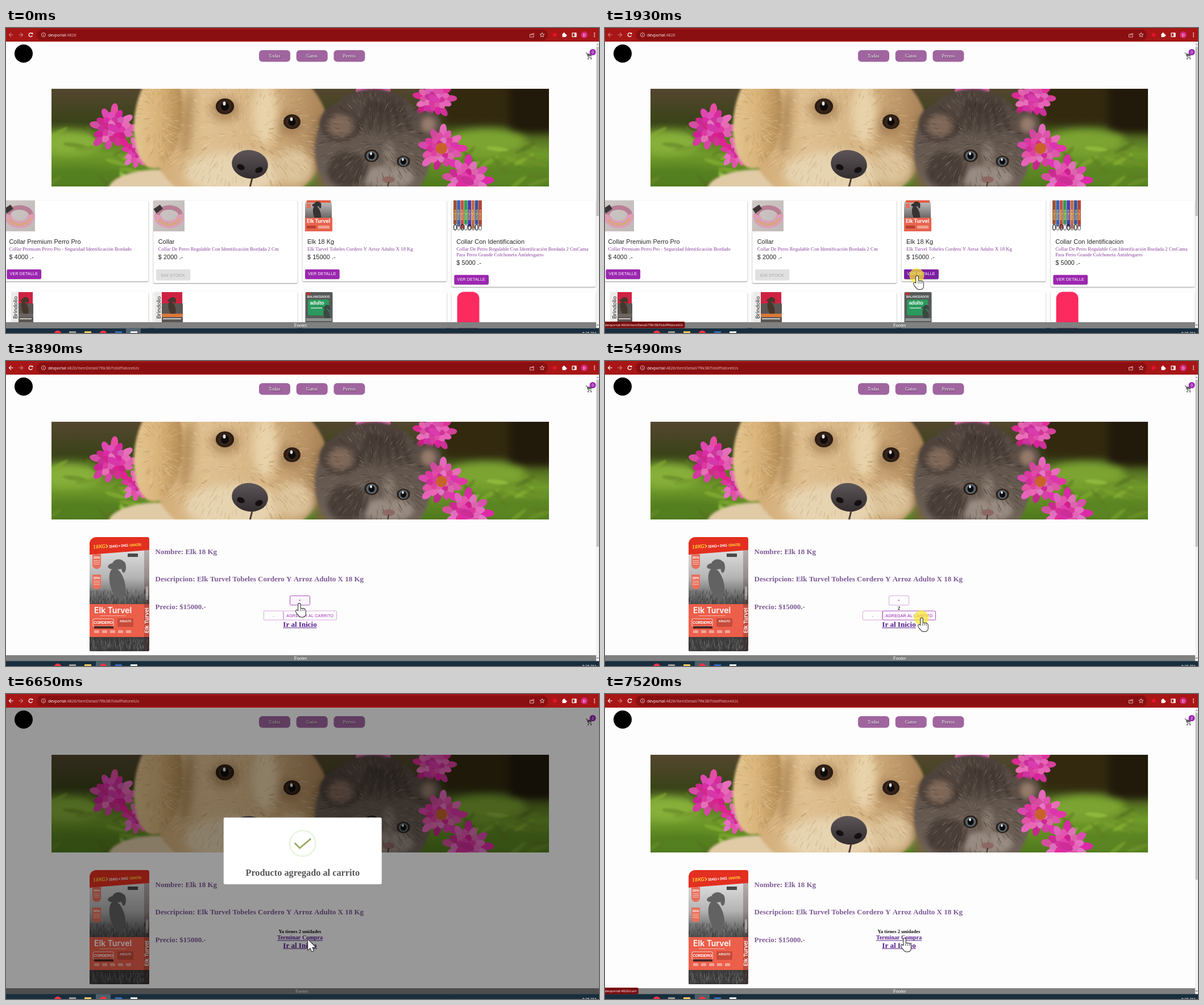
Recreate the animation shown at these times as an HTML page with a canvas. Size 1043 by 537 pixels, loop 8 s.

```html
<!DOCTYPE html>
<html lang="es">
<head>
<meta charset="utf-8">
<title>Tienda de mascotas</title>
<style>
html, body { margin: 0; width: 100%; height: 100%; overflow: hidden; background: #fdfdfd; }
canvas { display: block; width: 1043px; height: 537px; }
</style>
</head>
<body>
<canvas id="stage" width="1043" height="537"></canvas>
<script>
const W = 1043, H = 537, LOOP = 8000;
const PURPLE = '#9c27b0', HOST = 'devportal', PORT = ':4826', ITEM = '/itemDetail/7Rk38iTobilfNdorelUs';
const NAV = 1990, LOADED = 2320, ADDED = 5520, CLOSING = 7059, CLOSED = 7209;

const serif = px => px + 'px "Liberation Serif", serif', bold = px => 'bold ' + serif(px);
const sans = px => px + 'px "Liberation Sans", sans-serif', heavy = px => 'bold ' + sans(px);
const ui = px => px + 'px "Open Sans", sans-serif', brand = px => '600 ' + px + 'px Inter, sans-serif';

let g = document.getElementById('stage').getContext('2d');
let seed = 7;
const rnd = () => (seed = seed * 16807 % 2147483647) / 2147483647;
const clamp = v => Math.min(1, Math.max(0, v));
const ease = v => v * v * (3 - 2 * v);

// ---------- helpers ----------
function rect(x, y, w, h, color) { g.fillStyle = color; g.fillRect(x, y, w, h); }

function box(x, y, w, h, r, fill, line, lw = 1) {
  g.beginPath();
  g.roundRect(x, y, w, h, r);
  if (fill) { g.fillStyle = fill; g.fill(); }
  if (line) { g.strokeStyle = line; g.lineWidth = lw; g.stroke(); }
}

function oval(x, y, rx, ry, color, turn = 0) {
  g.beginPath();
  g.ellipse(x, y, rx, ry, turn, 0, 7);
  g.fillStyle = color;
  g.fill();
}

function ring(x, y, rx, ry, color, lw, from = 0, to = 7) {
  g.beginPath();
  g.ellipse(x, y, rx, ry, 0, from, to);
  g.strokeStyle = color;
  g.lineWidth = lw;
  g.stroke();
}

function line(p, color, lw) {
  g.beginPath();
  for (let i = 0; i < p.length; i += 2) g.lineTo(p[i], p[i + 1]);
  g.strokeStyle = color;
  g.lineWidth = lw;
  g.stroke();
}

function text(s, x, y, font, color, align = 'left', spacing = 0) {
  g.font = font;
  g.fillStyle = color;
  g.textAlign = align;
  g.letterSpacing = spacing + 'px';
  g.fillText(s, x, y);
  const w = g.measureText(s).width;
  g.letterSpacing = '0px';
  return w;
}

function fade(x0, y0, x1, y1, ...colors) {
  const f = g.createLinearGradient(x0, y0, x1, y1);
  colors.forEach((c, i) => f.addColorStop(i / (colors.length - 1), c));
  return f;
}

function placed(x, y, angle, draw) {
  g.save();
  g.translate(x, y);
  g.rotate(angle);
  draw();
  g.restore();
}

function upward(s, x, y, font, color) { placed(x, y, -Math.PI / 2, () => text(s, 0, 0, font, color)); }

function blurred(px, draw) {
  g.filter = `blur(${px}px)`;
  draw();
  g.filter = 'none';
}

function shadowed(color, blur, dx, dy, draw) {
  g.shadowColor = color;
  g.shadowBlur = blur;
  g.shadowOffsetX = dx;
  g.shadowOffsetY = dy;
  draw();
  g.shadowColor = 'transparent';
}

function layer(draw) {
  const c = document.createElement('canvas'), main = g;
  c.width = W;
  c.height = H;
  g = c.getContext('2d');
  draw();
  g = main;
  return c;
}

// ---------- banner ----------
function flower(x, y, r, heart) {
  for (let i = 0; i < 30; i++) {
    const a = i * 2.4, d = r * (0.85 - i * 0.028);
    oval(x + Math.cos(a) * d, y + Math.sin(a) * d, r * 0.3, r * 0.16, `hsl(${316 + rnd() * 10},${60 + rnd() * 15}%,${46 + rnd() * 22}%)`, a);
  }
  if (heart) oval(x, y, r * 0.25, r * 0.25, '#c8622a');
}

// short hairs pointing away from the middle of an oval
function fur(x, y, rx, ry, count, colors) {
  g.globalAlpha = 0.3;
  for (let i = 0; i < count; i++) {
    const a = rnd() * 7, d = Math.sqrt(rnd()), c = Math.cos(a), s = Math.sin(a), px = x + rx * d * c, py = y + ry * d * s;
    line([px, py, px + c * 9, py + s * 9 + 2], colors[i % colors.length], 1.2);
  }
  g.globalAlpha = 1;
}

function eye(x, y, r, iris) {
  oval(x, y, r * 1.15, r, '#2a1d15');
  oval(x, y, r * 0.85, r * 0.8, iris);
  oval(x, y, r * 0.5, r * 0.55, '#0d0b0b');
  oval(x - 1, y - r * 0.35, r * 0.18, r * 0.25, '#e4e6e8');
}

function garden() {
  rect(80, 107, 875, 172, fade(0, 107, 0, 279, '#54462f', '#3a4319', '#6f9a2a', '#4f781d'));
  blurred(7, () => {
    oval(110, 202, 60, 22, '#86b03a');
    oval(130, 262, 80, 16, '#547f20');
    rect(770, 95, 200, 75, '#33290f');
    rect(885, 95, 80, 90, '#211a0b');
    oval(845, 200, 70, 22, '#7ca432');
    oval(900, 262, 90, 18, '#5b8522');
  });
  blurred(1.5, () => {
    for (let i = 0; i < 40; i++) {
      oval((i % 2 ? 800 : 80) + rnd() * 150, 185 + rnd() * 95, 20, 4, `hsla(80,55%,${28 + rnd() * 26}%,.6)`, rnd() * 2 - 1);
    }
  });
  flower(188, 176, 40);
  flower(234, 218, 30);
  flower(645, 100, 36);
  flower(752, 124, 36);
}

function puppy() {
  blurred(2, () => {
    oval(270, 285, 90, 36, '#e0cba6');
    oval(410, 185, 158, 135, fade(250, 0, 568, 0, '#cfa871', '#dfc092', '#d5b281', '#a67f54'));
    oval(268, 160, 42, 88, fade(225, 0, 310, 0, '#e3c48f', '#d9b47a', '#b68d56'), 0.12);
  });
  blurred(8, () => {
    oval(318, 165, 9, 60, '#b08a58', 0.1);
    oval(556, 225, 14, 70, '#7b6044');
    oval(385, 143, 26, 20, '#b08b5e');
    oval(500, 170, 24, 20, '#a98459');
    oval(455, 150, 22, 55, '#e8d2aa');
    oval(400, 255, 85, 38, '#e6d3b0');
    oval(505, 245, 36, 32, '#dcc39a');
  });
  fur(410, 190, 140, 100, 700, ['#f3e4c4', '#a98150', '#d2ae78']);
  fur(268, 165, 34, 72, 150, ['#f0d9ac', '#a98150']);
  eye(385, 138, 14, '#3a2417');
  eye(503, 165, 13, '#3a2417');
  oval(429, 240, 32, 25, fade(0, 215, 0, 265, '#5d5557', '#332d2f'), 0.15);
  oval(413, 245, 7, 5, '#141011', 0.4);
  oval(445, 250, 7, 5, '#141011', -0.4);
  line([433, 264, 429, 281], '#4d3b33', 3);
}

function kitten() {
  blurred(2, () => {
    oval(646, 215, 102, 108, fade(0, 107, 0, 279, '#4c413a', '#62564d', '#6f6259'));
    oval(588, 168, 36, 34, '#4f433c');
    oval(738, 172, 28, 24, '#5b4e46', -0.4);
  });
  blurred(4, () => {
    oval(588, 172, 22, 20, '#7f6757');
    oval(743, 170, 13, 14, '#957b6b');
    oval(672, 262, 46, 20, '#988b81');
    oval(600, 250, 36, 32, '#4a3f38');
    oval(674, 225, 9, 26, '#887a6f');
    for (let i = 0; i < 6; i++) oval(630 + i * 14, 155, 3, 32, '#342b26', 0.35 - i * 0.14);
  });
  fur(650, 205, 92, 90, 600, ['#a09184', '#2b2420', '#76685d']);
  eye(643, 225, 11, '#56646c');
  eye(699, 235, 10, '#56646c');
  oval(673, 267, 11, 6, '#8d6862');
  line([673, 271, 671, 282], '#40322e', 2);
}

function banner() {
  g.save();
  g.beginPath();
  g.rect(80, 107, 875, 172);
  g.clip();
  garden();
  puppy();
  kitten();
  flower(766, 212, 40, true);
  flower(810, 268, 42);
  g.restore();
}

// ---------- products ----------
function dog(x, y, s, color) {
  oval(x, y + 12 * s, 13 * s, 28 * s, color, -0.25);
  oval(x + 2 * s, y - 22 * s, 11 * s, 9 * s, color);
  oval(x - 8 * s, y - 19 * s, 9 * s, 5 * s, color, -0.2);
  oval(x + 11 * s, y - 17 * s, 4 * s, 10 * s, color);
}

function grass(x, y, w, h) {
  for (let i = 0; i < w * 3; i++) {
    const px = x + rnd() * w, py = y + rnd() * h, v = 30 + rnd() * 120 | 0;
    line([px, py, px + rnd() * 4 - 2, py - 7], `rgba(${v},${v},${v},.6)`, 0.8);
  }
}

function bigBag() {
  g.save();
  g.beginPath();
  g.roundRect(147, 310, 105, 201, [12, 4, 3, 2]);
  g.clip();
  rect(147, 310, 105, 201, fade(0, 335, 0, 428, '#dcdcdc', '#b4b4b4', '#4a4a4a'));
  grass(147, 408, 105, 22);
  dog(196, 380, 1, '#626262');
  rect(147, 428, 105, 58, '#ec5f4b');
  rect(147, 486, 105, 26, '#3a3a3a');
  grass(147, 493, 105, 18);
  rect(243, 320, 9, 191, 'rgba(60,20,20,.25)');
  placed(147, 319, -0.08, () => rect(-4, -10, 120, 32, '#e32f20'));
  g.restore();
  placed(153, 330.5, -0.06, () => {
    text('18KG', 0, 0, 'italic 700 9px Lato, sans-serif', '#ffd23c');
    line([23, -6, 26, -3, 23, 0], '#ffd23c', 1.4);
    text('15 KG + 3 KG', 28, 0, heavy(6.6), '#fff', 'left', -0.7);
    text('GRATIS', 64, 0, heavy(6.6), '#ffd23c', 'left', -0.6);
  });
  for (const y of [340, 376]) {
    box(152, y, 15, 26, [0, 0, 7, 7], '#e7705c');
    text('30%', 159.5, y + 8, heavy(6), '#fff', 'center');
    for (let i = 0; i < 3; i++) rect(154, y + 11 + i * 3, 11, 1, '#f5c4ba');
  }
  rect(214, 339, 18, 6, '#4a4a4a');
  text('Elk Turvel', 155, 444, brand(14), '#fff');
  rect(165, 448, 46, 1, '#f6b7ac');
  box(153, 454, 36, 13, 2, '#e4503c', '#fff', 0.8);
  text('CORDERO', 171, 463, heavy(7), '#fff', 'center', -0.3);
  box(196, 453, 28, 15, 2, '#c74a3a');
  text('ADULTO', 210, 460, heavy(5), '#fff', 'center');
  rect(155, 467, 34, 4, '#4b2622');
  for (let i = 0; i < 5; i++) rect(155 + i * 14, 474, 9, 5, '#f1a598');
  upward('Elk Turvel', 250.5, 479, brand(9.5), '#fff');
  upward('CORDERO', 250, 420, heavy(4.5), '#eee');
}

function collar(x) {
  rect(x, 303.5, 55, 54.5, fade(x, 303, x + 55, 358, '#cfc8c6', '#bfb9b8'));
  ring(x + 28, 329, 20, 13, '#b97f96', 8, 3, 6.4);
  ring(x + 28, 331, 20, 15, '#dc9fb5', 13, -0.2, 3.3);
  g.setLineDash([3, 2]);
  ring(x + 28, 331, 20, 15, '#d3ac55', 4, 0.3, 2.7);
  g.setLineDash([]);
  placed(x + 9, 319, -0.6, () => rect(-7, -5, 14, 9, '#3a3635'));
}

function smallBag() {
  box(526, 303.5, 47, 54.5, [6, 6, 0, 0], fade(0, 303, 0, 334, '#c9c7c6', '#6b6766'));
  rect(529, 303.5, 42, 4, '#e4593f');
  dog(547, 321, 0.5, '#353333');
  rect(529, 309, 7, 8, '#e7705c');
  rect(526, 334, 48, 24, '#e8634e');
  text('Elk Turvel', 549.5, 343, 'bold 8.6px Inter, sans-serif', '#fff', 'center');
  rect(529, 348, 16, 5, '#b8402f');
  rect(549, 348, 20, 5, '#f0a394');
}

function straps() {
  for (let i = 0; i < 8; i++) {
    const x = 787 + i * 6.3;
    rect(x, 303.5, 5.8, 42 + i % 3 * 4, `hsl(${[18, 220, 5, 140, 250][i % 5]},52%,${40 + i % 3 * 6}%)`);
    upward('RONDA', x + 4.7, 338, heavy(5), '#e8cf6a');
    ring(x + 3, 351, 2.4, 4.8, i % 2 ? '#777' : '#222', 1.3);
  }
}

function stripBag(x, w, low) {
  rect(x, 465, w, 53, '#ecebea');
  rect(x + 13, 465, w - 14, 20, fade(x + 13, 0, x + w, 20, '#5a2b33', '#cf2243'));
  rect(x + 13, 485, w - 13, 33, '#5b5654');
  dog(x + w * 0.62, 488, 0.46, '#46372c');
  rect(x + 13, 503, w - 13, 6, low);
  rect(x + 15, 511, w - 18, 2, '#cfcac7');
  upward('Brindolio', x + 10.5, 512, '10px Lato, sans-serif', '#222');
}

function greenBag() {
  box(526.5, 465, 48, 60, 2, '#565b59');
  rect(528, 466, 8, 4, '#c23030');
  text('BALANCEADOS', 549.5, 474.5, heavy(5.4), '#eee', 'center', -0.2);
  box(531, 478, 37, 28, 3, '#2c9a5e');
  text('adulto', 547, 487, heavy(8.4), '#fff', 'center');
  rect(536, 492, 20, 2, '#9fd4b5');
  dog(564, 500, 0.4, '#3b4a42');
  rect(528, 511, 45, 5, '#8f9492');
}

// ---------- browser and page ----------
function browser(inDetail) {
  const soft = '#e7c3c3', pale = '#cf8080';
  rect(0, 0, W, 24, '#a81616');
  box(54, 2.5, 899, 19.5, 9.7, '#8a0f11');
  const arrow = (x, d, c) => {
    line([x - 3.6, 12, x + 3.6, 12], c, 1.1);
    line([x, 12 - 3.6, x + d * 3.6, 12, x, 12 + 3.6], c, 1.1);
  };
  arrow(9, -1, inDetail ? '#fff' : pale);
  arrow(26, 1, pale);
  ring(43.5, 12, 3.2, 3.2, '#fff', 1.3, 0.4, 5.6);
  rect(45, 8.5, 2.4, 2.4, '#fff');
  ring(66, 12, 3.6, 3.6, soft, 0.9);
  text('i', 66, 14.3, heavy(6), soft, 'center');
  const w = text(HOST, 74, 14.8, ui(7.1), '#fff');
  text(PORT + (inDetail ? ITEM : ''), 74 + w, 14.8, ui(7.1), '#e3b9b9');
  box(921.5, 11, 6.5, 5, 0, null, soft, 0.9);
  line([924, 13, 926, 10, 929, 10], soft, 0.9);
  const star = [];
  for (let i = 0; i <= 10; i++) {
    const r = i % 2 ? 1.8 : 4.2, a = i * Math.PI / 5 - Math.PI / 2;
    star.push(943 + Math.cos(a) * r, 12.3 + Math.sin(a) * r);
  }
  line(star, soft, 0.9);
  oval(965, 12, 3.5, 3.5, '#e3122b');
  rect(978.5, 10, 6, 6, '#fff');
  oval(981.5, 9.6, 1.5, 1.5, '#fff');
  oval(985, 13, 1.5, 1.5, '#fff');
  box(996, 8.8, 7, 6.6, 0.5, null, '#fff', 1.2);
  rect(1000, 9, 3, 6, '#fff');
  oval(1017, 12, 6, 6, '#d3277d');
  text('D', 1017, 14.6, sans(7), '#fff', 'center');
  for (let i = 0; i < 3; i++) oval(1035, 9 + i * 3, 0.9, 0.9, '#fff');
}

function header() {
  rect(0, 24, W, 504, '#fdfdfd');
  oval(31, 45, 16, 16, '#000');
  ['Todas', 'Gatos', 'Perros'].forEach((s, i) => {
    const x = 445 + i * 65.7;
    box(x, 39, 55, 20.5, 6, '#a0659f');
    shadowed('rgba(0,0,0,.6)', 1.5, 0.7, 0.7, () => text(s, x + 27.3, 52, serif(8.69), '#fff', 'center'));
  });
  line([1019.5, 44, 1021.5, 44, 1024.5, 51.5, 1030, 51.5], '#5f5f5f', 1.2);
  rect(1022.5, 45.3, 7.5, 4.2, '#5f5f5f');
  for (const x of [1024, 1029]) oval(x, 54, 1.2, 1.2, '#5f5f5f');
  banner();
}

function card(x, y, h) {
  shadowed('rgba(0,0,0,.42)', 2, 0, 0.9, () => box(x, y, 253.5, h, 2, '#fff'));
}

function detailButton(x, y, color) {
  box(x, y, 60.7, 17, 2.2, color);
  rect(x + 1, y + 17, 58.7, 0.8, 'rgba(0,0,0,.22)');
  text('VER DETALLE', x + 5.2, y + 10.4, sans(7.06), '#fff', 'left', 0.2);
}

const items = [
  { name: 'Collar Premium Perro Pro', price: 4000, about: ['Collar Premium Perro Pro - Seguridad Identificación Bordado'] },
  { name: 'Collar', price: 2000, sold: true, about: ['Collar De Perro Regulable Con Identificación Bordada 2 Cm'] },
  { name: 'Elk 18 Kg', price: 15000, about: ['Elk Turvel Tobeles Cordero Y Arroz Adulto X 18 Kg'] },
  { name: 'Collar Con Identificacion', price: 5000, about: ['Collar De Perro Regulable Con Identificación Bordada 2 CmCama', 'Para Perro Grande Colchoneta Antidesgarro'] }
];

function list() {
  items.forEach((it, i) => {
    const x = i * 262.3 - 3, tx = x + 8.4, drop = (it.about.length - 1) * 9.8;
    card(x, 303.5, 142.5 + drop + (it.sold ? 3 : 0));
    card(x, 465, 90);
    text(it.name, tx, 379.5, sans(10.86), '#222', 'left', 0.08);
    it.about.forEach((s, k) => text(s, tx, 392 + k * 9.8, serif(8.69), '#8b3f9e'));
    text('$ ' + it.price + ' .-', tx, 407 + drop, sans(10.86), '#222', 'left', 0.08);
    if (it.sold) {
      box(264, 425, 60.3, 19.5, 2.2, '#e0e0e0');
      text('SIN STOCK', 272.3, 437.8, sans(7.6), '#a6a6a6', 'left', 0.217);
    } else detailButton(x + 4.4, 425 + drop, PURPLE);
  });
  collar(-4);
  collar(259);
  smallBag();
  straps();
  stripBag(9, 39, '#6b6664');
  stripBag(261, 50, '#d9783a');
  greenBag();
  box(793.5, 464.5, 39, 70, 12, '#fb2a5f');
}

function detail() {
  bigBag();
  ['Nombre: Elk 18 Kg', 'Descripcion: Elk Turvel Tobeles Cordero Y Arroz Adulto X 18 Kg', 'Precio: $15000.-']
    .forEach((s, i) => text(s, 262.5, 339.8 + i * 48.6, bold(13.03), '#7d5b96'));
}

const area = (x, y, w, h) => ({ x, y, w, h });
const VIEW = area(526, 425, 60.7, 17), PLUS = area(499.5, 413.3, 35, 16.5), MINUS = area(453.3, 440, 34.7, 16);
const ADD = area(488, 440, 93.5, 16), HOME = area(487, 457, 60, 14), PAY = area(477, 423.5, 80, 11);
const inside = (p, r) => p.x >= r.x && p.x <= r.x + r.w && p.y >= r.y && p.y <= r.y + r.h;

function outlined(r, s, p) {
  const hot = inside(p, r);
  box(r.x, r.y, r.w, r.h, 2, hot ? 'rgba(156,39,176,.04)' : null, hot ? PURPLE : 'rgba(156,39,176,.5)', 0.8);
  text(s, r.x + r.w / 2, r.y + r.h / 2 + 2.5, sans(7.06), PURPLE, 'center', 0.2);
}

function link(s, y, px) {
  const w = text(s, 517, y, bold(px), '#551a8b', 'center');
  rect(517 - w / 2, y + 1.3, w, 1, '#551a8b');
}

function counter(t, p) {
  outlined(PLUS, '+', p);
  outlined(MINUS, '-', p);
  outlined(ADD, 'AGREGAR AL CARRITO', p);
  text(t < 3790 ? 0 : t < 3990 ? 1 : 2, 517, 437.6, bold(8.69), '#111', 'center');
  link('Ir al Inicio', 468, 13.03);
}

function bought() {
  text('Ya tienes 2 unidades', 517, 421, bold(8.69), '#111', 'center');
  link('Terminar Compra', 432.2, 10.16);
  link('Ir al Inicio', 446.5, 13.03);
}

function footer(t, modal) {
  const w = modal ? W : 1038;
  rect(0, 518, w, 10.5, '#808080');
  text('Footer', w / 2 - 1, 526, serif(8.69), '#fff', 'center');
  if (modal) return;
  rect(1038, 24, 5, 504.5, '#f1f1f1');
  rect(1038.4, 33, 4.3, t < NAV ? 298 : 294, '#c1c1c1');
  line([1039, 30, 1040.6, 28, 1042.2, 30], '#777', 1);
  line([1039, 522, 1040.6, 524, 1042.2, 522], '#444', 1);
}

function taskbar(t) {
  rect(0, 528.5, W, 9, '#182e3e');
  if (t < 1730) rect(211, 528.5, 26, 9, '#51636f');
  if (t >= NAV) rect(158, 528.5, 26, 9, '#4b606c');
  for (const x of [91, 171]) oval(x, 539, 6.5, 6.5, '#ee3345');
  ['#9a9a9a', '#f0c75f', '#3568b8', '#e9edf0'].forEach((c, i) => rect(111 + i * 27 + (i > 1) * 27, 534, 12, 4, c));
  text('5:35 PM', 1038, 540.2, ui(6.5), '#fff', 'right');
}

function status(t) {
  const s = t >= 1730 && t < 2600 ? ITEM : t >= 4800 && t < 5200 ? '' : t >= 7450 ? '/cart' : null;
  if (s === null) return;
  g.font = ui(6.1);
  const label = HOST + PORT + s;
  box(-3, 517, g.measureText(label).width + 6, 11.5, 2, '#7a0d0f');
  text(label, -0.5, 525, ui(6.1), '#fff');
}

// ---------- dialog ----------
function pop(ms) {
  const u = clamp(ms / 300);
  return 1 - 0.3 * Math.pow(1 - u, 1.5) * Math.cos(4.1 * u);
}

function dialog(t) {
  const ms = t - ADDED, out = clamp((t - CLOSING) / (CLOSED - CLOSING)), s = out ? 1 - out / 2 : pop(ms);
  rect(0, 24, W, 504.5, `rgba(0,0,0,${0.4 * clamp(ms / 100) * clamp(1 - 1.7 * out)})`);
  g.save();
  g.globalAlpha = 1 - out;
  g.translate(521.8, 276.2);
  g.scale(s, s);
  box(-139, -58.8, 278, 117.6, 2.7, '#fff');
  ring(0, -13.2, 22.7, 22.7, 'rgba(165,220,134,.32)', 2.3);
  const a = clamp((ms - 400) / 120), b = clamp((ms - 520) / 230);
  if (a) line([-14, -14, -14 + 8.8 * a, -14 + 9.2 * a, -14 + 8.8 * a + 19.7 * b, -14 + 9.2 * a - 16.8 * b], '#98a860', 2.7);
  text('Producto agregado al carrito', 0, 44, bold(16.3), '#565656', 'center');
  g.restore();
}

// ---------- pointer ----------
// each move: start, end, target x, target y
const moves = [
  [420, 560, 616, 361], [830, 1600, 549, 436.5], [2320, 3070, 556, 452], [3140, 3620, 516, 427], [4240, 4450, 569, 470],
  [4590, 4800, 544, 466], [5060, 5340, 557, 452.5], [5900, 6170, 538, 437], [6240, 7040, 525, 429], [7250, 7520, 527, 430]
];
const clicks = [1860, 3760, 3960, 5420, 7080];

function pointer(t) {
  const p = { x: 890, y: 475 };
  for (const [from, to, x, y] of moves) {
    const k = ease(clamp((t - from) / (to - from)));
    p.x += (x - p.x) * k;
    p.y += (y - p.y) * k;
  }
  return p;
}

function targets(t) {
  if (t < NAV) return [VIEW];
  if (t < LOADED) return [];
  if (t < ADDED) return [PLUS, MINUS, ADD, HOME];
  return t < CLOSED ? [] : [PAY];
}

const ARROW = new Path2D('M0 0V17.6L4 13.9 6.7 20.3 9.7 19 7 12.8H12.6Z');
const HAND = new Path2D();
HAND.roundRect(-1.8, 0, 3.5, 16, 1.7);
HAND.roundRect(-1.8, 9, 12.6, 14.5, [0, 4, 5, 5]);
HAND.ellipse(-2, 16.5, 2.3, 5.5, -0.7, 0, 7);

function cursor(t, p) {
  if (clicks.some(c => t >= c && t < c + 130)) oval(p.x - 0.7, p.y - 0.5, 13, 13, 'rgba(246,232,48,.72)');
  const hand = targets(t).some(r => inside(p, r)), shape = hand ? HAND : ARROW;
  placed(p.x, p.y, 0, () => {
    g.lineJoin = 'round';
    g.lineWidth = 2;
    g.strokeStyle = '#222';
    g.fillStyle = '#fff';
    g.stroke(shape);
    g.fill(shape);
    if (hand) for (let i = 0; i < 3; i++) line([1.8 + i * 3.2, 9.5, 1.8 + i * 3.2, 13.5], '#222', 0.8);
  });
}

// ---------- scene ----------
const head = layer(header), listPage = layer(list), detailPage = layer(detail);

function draw(t) {
  const p = pointer(t), modal = t >= ADDED && t < CLOSED;
  g.drawImage(head, 0, 0);
  browser(t >= NAV);
  oval(1032, 42.5, 5.5, 5.5, PURPLE);
  text(t < ADDED ? 0 : 2, 1032, 44.9, sans(6.5), '#fff', 'center');
  if (t < NAV) {
    g.drawImage(listPage, 0, 0);
    if (inside(p, VIEW)) detailButton(VIEW.x, VIEW.y, '#7b1fa2');
  } else if (t >= LOADED) {
    g.drawImage(detailPage, 0, 0);
    if (t < ADDED) counter(t, p); else bought();
  }
  footer(t, modal);
  if (modal) dialog(t);
  taskbar(t);
  status(t);
  if (t >= 420) cursor(t, p);
}

const start = performance.now();
function tick() {
  draw((performance.now() - start) % LOOP);
  requestAnimationFrame(tick);
}
tick();
</script>
</body>
</html>
```
